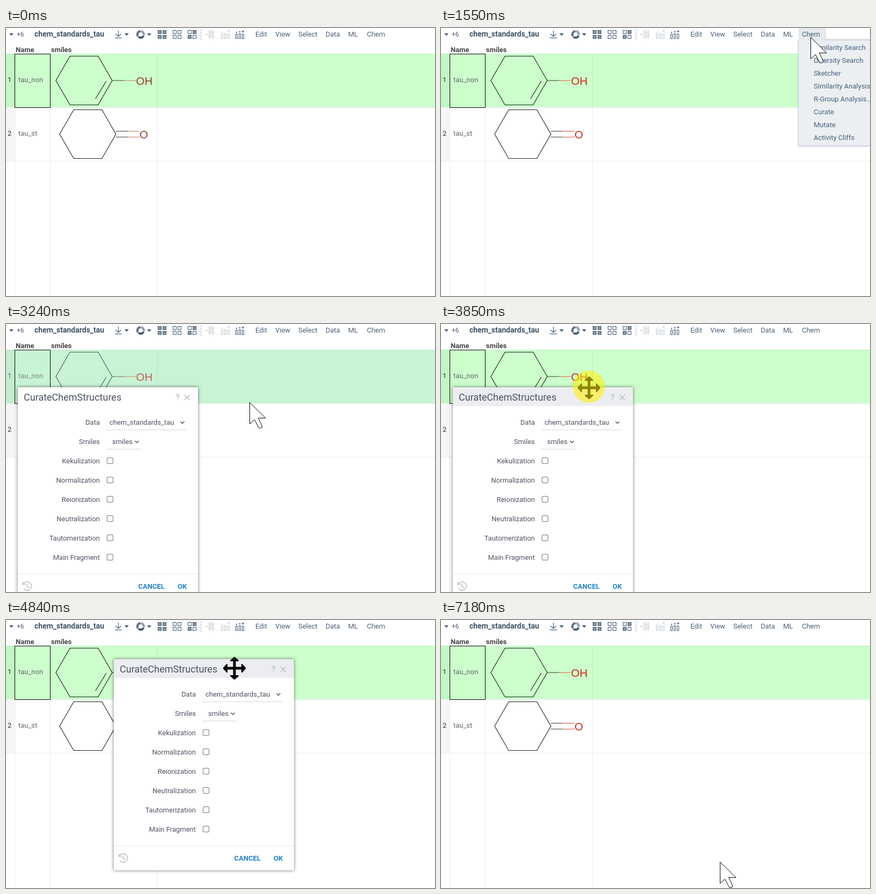
Write an HTML page with a canvas that moves like this. It is 800 by 500 pixels and loops after 8 s.

```html
<!DOCTYPE html>
<html lang="en">
<head>
<meta charset="utf-8">
<title>Curate chemical structures</title>
<style>
html, body { margin: 0; width: 100%; height: 100%; overflow: hidden; background: #fff; }
canvas { display: block; }
</style>
</head>
<body>
<canvas id="stage" width="800" height="500"></canvas>
<script>
const ctx = document.getElementById('stage').getContext('2d');
const LOOP = 8000;
const SLATE = '#4d6076';

// Pointer path: time, x, y
const PATH = [
  [270, 758, 494], [1010, 683, 151], [1080, 682, 143], [1150, 681, 135], [1210, 681, 135],
  [1500, 689, 17], [1940, 689, 17], [2340, 699, 158], [2940, 699, 158], [3510, 247, 135],
  [3780, 247, 135], [3850, 276, 119], [3920, 276, 119], [4110, 426, 90], [4840, 426, 90],
  [5630, 376, 358], [6230, 376, 358], [6360, 448, 358], [6440, 448, 358],
  [6800, 525, 451], [6980, 520, 451]
];
const CLICKS = [[2740, 2870], [3710, 4180], [5840, 5970], [7040, 7180]];
const MENU = [1480, 2870], DIALOG = [2940, 7180], CHECKED_AT = 5970;
const GRAB = { x: 225, y: 17 }, DRAG_LAG = 70;

const within = (t, [from, to]) => t >= from && t < to;

function pointerAt(t) {
  const next = PATH.findIndex(key => key[0] > t);
  if (next === 0) return { x: PATH[0][1], y: PATH[0][2] };
  if (next < 0) { const [, x, y] = PATH[PATH.length - 1]; return { x, y }; }
  const [t0, x0, y0] = PATH[next - 1], [t1, x1, y1] = PATH[next];
  const u = (t - t0) / (t1 - t0), e = u * u * (3 - 2 * u);
  return { x: x0 + (x1 - x0) * e, y: y0 + (y1 - y0) * e };
}

function dialogAt(t) {
  const p = pointerAt(Math.min(Math.max(t - DRAG_LAG, 3510), 4500));
  return { x: Math.round(p.x - GRAB.x), y: Math.round(p.y - GRAB.y) };
}

function text(str, x, y, color = SLATE, size = 13, weight = 400, align = 'left') {
  ctx.font = `${weight} ${size}px Roboto, sans-serif`;
  ctx.textAlign = align;
  ctx.fillStyle = color;
  ctx.fillText(str, x, y);
}

function rect(x, y, w, h, color) {
  ctx.fillStyle = color;
  ctx.fillRect(x, y, w, h);
}

function frame(x, y, w, h, color, fill) {
  if (fill) rect(x, y, w, h, fill);
  ctx.strokeStyle = color;
  ctx.lineWidth = 1;
  ctx.strokeRect(x + .5, y + .5, w - 1, h - 1);
}

function line(points, color, width = 1, close = false) {
  ctx.beginPath();
  for (let i = 0; i < points.length; i += 2) ctx.lineTo(points[i], points[i + 1]);
  if (close) ctx.closePath();
  ctx.strokeStyle = color;
  ctx.lineWidth = width;
  ctx.stroke();
}

function arc(x, y, r, from, to, color, width) {
  ctx.beginPath();
  ctx.arc(x, y, r, from, to);
  ctx.strokeStyle = color;
  ctx.lineWidth = width;
  ctx.stroke();
}

function caret(x) {
  ctx.fillStyle = '#43607f';
  ctx.fill(new Path2D(`M${x - 4} 10h8l-4 4.5z`));
}

const chevron = (x, y) => line([x - 3.5, y - 2, x, y + 1.5, x + 3.5, y - 2], '#4a4f57', 1.4);

function squares(x, filled) {
  for (let i = 0; i < 4; i++)
    frame(x + (i % 2) * 9, 4 + (i >> 1) * 9, 7, 7, '#3d5570', filled[i] ? '#8799ab' : '#fff');
}

function bars(x, color, mark) {
  [0, 6, 12].forEach((dx, i) => frame(x + dx, 11 - i % 2, 4, 9 + i % 2, color));
  if (mark === '+') {
    line([x + 14, 4, x + 14, 9], color);
    line([x + 11.5, 6.5, x + 16.5, 6.5], color);
    rect(x + 1, 7, 2, 2, color);
    rect(x + 7, 6, 2, 2, color);
  } else {
    line([x + 12, 4, x + 16, 8], color);
    line([x + 16, 4, x + 12, 8], color);
    rect(x + 1, 7, 2, 2, color);
  }
}

function toolbar() {
  caret(10);
  text('+6', 20, 16, SLATE, 12);
  text('chem_standards_tau', 53, 16, '#3f5268', 14, 700);
  line([209.5, 5, 209.5, 16], '#43607f', 1.2);
  line([204.5, 11, 209.5, 16, 214.5, 11], '#43607f', 1.2);
  line([203, 18.5, 216, 18.5], '#43607f', 1.2);
  caret(225);
  arc(251, 12, 6, -1.4, .2, '#8a9bac', 4);
  arc(251, 12, 6, .4, 2.3, '#43586f', 4);
  arc(251, 12, 6, 2.5, 4.7, '#5b7086', 4);
  caret(267);
  squares(283, [1, 1, 1, 1]);
  squares(311, [0, 0, 0, 0]);
  squares(339, [0, 1, 1, 0]);
  ctx.setLineDash([3, 2]);
  line([363.5, 3, 363.5, 21], '#9aa5b0');
  ctx.setLineDash([]);
  for (const y of [5, 10, 15]) frame(378, y, 10, 4, '#c3c8cd');
  line([372, 10, 376, 14], '#c3c8cd');
  line([376, 10, 372, 14], '#c3c8cd');
  bars(401, '#c3c8cd', 'x');
  bars(428, '#3d5570', '+');
}

function menuBar() {
  [['Edit', 465], ['View', 502], ['Select', 545], ['Data', 596], ['ML', 638], ['Chem', 673]]
    .forEach(([label, x]) => text(label, x, 16));
}

function atom(label, x, y, color) {
  ctx.font = '20.5px "Liberation Sans", Arial, sans-serif';
  ctx.textAlign = 'left';
  ctx.fillStyle = color;
  ctx.fillText(label, x, y);
}

function hexagon(x, y) {
  line([x, y, x + 26.3, y - 45.5, x + 78.8, y - 45.5, x + 105, y,
    x + 78.8, y + 45.5, x + 26.3, y + 45.5], '#10200f', 1.1, true);
}

function bond(x, y, end, color) {
  const mid = (x + end) / 2;
  line([x, y, mid, y], '#2f4030');
  line([mid, y, end, y], color);
}

function grid(t, hoveredRow) {
  const red = t < 1080 ? '#93402f' : '#c62a1b';
  const bondRed = t < 1080 ? '#c9705c' : '#d8503f';
  text('Name', 18, 45, '#444', 13, 700);
  text('smiles', 84, 45, '#444', 13, 700);
  rect(0, 48, 800, 100, '#ccffcc');
  rect(0, 48, 16, 100, '#c4f6c4');
  rect(0, 149, 16, 99, '#f6f6f6');
  for (const y of [48, 148, 248]) rect(0, y, 800, 1, y < 248 ? 'rgba(0,0,0,.06)' : '#ebebeb');
  for (const x of [16, 82, 282]) rect(x, 48, 1, 452, 'rgba(0,0,0,.08)');

  text('1', 3, 101, '#333');
  text('tau_non', 23, 101, '#666');
  hexagon(93, 98);
  line([187, 99, 167, 132], '#10200f', 1.1);
  bond(198, 98, 242, bondRed);
  atom('OH', 242.5, 105.5, red);

  text('2', 3, 201, '#333');
  text('tau_st', 23, 201, '#666');
  hexagon(100, 198);
  bond(205, 192.5, 249, bondRed);
  bond(205, 203.5, 249, bondRed);
  atom('O', 249, 205.5, red);

  if (hoveredRow >= 0) rect(0, 48 + hoveredRow * 100, 800, 100, 'rgba(190,215,228,.3)');
  frame(16, 48, 67, 101, '#000');
}

function chemMenu(pointer) {
  ctx.save();
  ctx.shadowColor = 'rgba(60,90,130,.4)';
  ctx.shadowBlur = 4;
  rect(667, 22, 140, 198, '#eceff2');
  ctx.restore();
  frame(666, 22, 140, 198, '#c3ccd6');
  rect(667, 0, 50, 24, '#e6eaee');
  line([716.5, 0, 716.5, 22], '#ccd4dc');
  text('Chem', 673, 16);
  const hovered = Math.floor((pointer.y - 25) / 24);
  ['Similarity Search', 'Diversity Search', 'Sketcher', 'Similarity Analysis...',
    'R-Group Analysis...', 'Curate', 'Mutate', 'Activity Cliffs'].forEach((label, i) => {
    if (i === hovered) rect(669, 25 + i * 24, 131, 24, '#d6dee6');
    text(label, 695, 41 + i * 24, '#46607e');
  });
}

function checkbox(x, y, checked) {
  ctx.beginPath();
  ctx.roundRect(x + .5, y + .5, 11, 11, 1.5);
  ctx.fillStyle = checked ? '#2083d5' : '#fff';
  ctx.fill();
  ctx.strokeStyle = checked ? '#2083d5' : '#70757c';
  ctx.lineWidth = 1;
  ctx.stroke();
  if (checked) line([x + 2.8, y + 6, x + 5, y + 8.5, x + 9.3, y + 3.5], '#fff', 1.6);
}

function dialog(t, at, headerHovered) {
  ctx.save();
  ctx.translate(at.x, at.y);
  ctx.save();
  ctx.shadowColor = 'rgba(0,0,0,.55)';
  ctx.shadowBlur = 6;
  rect(0, 0, 336, 394, '#fff');
  ctx.restore();
  if (headerHovered) rect(0, 0, 336, 35, '#ebedf1');
  const ink = '#4d5361', faint = '#b4b8bd', blue = '#2083c9';
  text('CurateChemStructures', 11, 25, ink, 18);
  text('?', 294.5, 24, faint, 14, 500);
  line([311, 14, 321, 24], faint, 1.3);
  line([321, 14, 311, 24], faint, 1.3);

  text('Data', 153, 70, ink, 13, 400, 'right');
  text('chem_standards_tau', 171, 70, ink);
  rect(165, 79, 150, 1, '#d5d8dc');
  chevron(307, 66);
  text('Smiles', 153, 106, ink, 13, 400, 'right');
  text('smiles', 176, 106, ink);
  rect(165, 115, 65, 1, '#d5d8dc');
  chevron(222, 102);
  ['Kekulization', 'Normalization', 'Reionization', 'Neutralization',
    'Tautomerization', 'Main Fragment'].forEach((label, i) => {
    text(label, 153, 142 + i * 36, ink, 13, 400, 'right');
    checkbox(166, 131 + i * 36, i === 4 && t >= CHECKED_AT);
  });

  rect(0, 348, 336, 1, '#e8eaec');
  arc(17.5, 371, 8, -2.7, 2.5, '#b9bcc0', 1.4);
  line([9, 363, 9.5, 368, 14.5, 367.5], '#b9bcc0', 1.4);
  line([17, 366, 17, 372, 21, 374], '#b9bcc0', 1.4);
  text('CANCEL', 224.5, 376, blue, 13, 700);
  text('OK', 298, 376, blue, 13, 700);
  ctx.restore();
}

const ARROW = new Path2D('M.5 .5V40.5L9.5 32.5 17 47 20 48.5 23.5 47 23 43 16.5 29.5H30Z');
const HAND = new Path2D('M-3 22V3Q-3 0 0 0T3 3V14Q6 11 9 15 13 13 15 17 20 16 20 21V29L16 36V41H0V37L-9 26Q-11 20-7 20Z');

function drawPointer({ x, y }, kind) {
  ctx.save();
  ctx.translate(Math.round(x), Math.round(y));
  ctx.lineWidth = 1;
  if (kind === 'move') {
    ctx.fillStyle = '#000';
    for (let i = 0; i < 4; i++) {
      ctx.fill(new Path2D('M-2.5 2.5V-13H-8V-14.5L-1-21H1L8-14.5V-13H2.5V2.5Z'));
      ctx.rotate(Math.PI / 2);
    }
  } else {
    const shape = kind === 'hand' ? HAND : ARROW;
    ctx.fillStyle = '#fff';
    ctx.strokeStyle = '#000';
    ctx.fill(shape);
    ctx.stroke(shape);
  }
  ctx.restore();
}

function draw(t) {
  const p = pointerAt(t), box = dialogAt(t);
  const menuOpen = within(t, MENU), dialogOpen = within(t, DIALOG);
  const dx = p.x - box.x, dy = p.y - box.y;
  const overDialog = dialogOpen && dx >= 0 && dx < 336 && dy >= 0 && dy < 394;
  const onHeader = dialogOpen && (within(t, [3510, 4840]) || (overDialog && dy < 35));
  const onControl = overDialog &&
    ((dx > 164 && dx < 181 && dy > 274 && dy < 292) || (dx > 285 && dx < 323 && dy > 355));
  const freePointer = t >= 270 && !menuOpen && !overDialog && !onHeader;
  const row = freePointer && p.y >= 48 && p.y < 248 ? Math.floor((p.y - 48) / 100) : -1;

  rect(0, 0, 800, 500, '#fff');
  toolbar();
  menuBar();
  grid(t, row);
  if (menuOpen) chemMenu(p);
  if (dialogOpen) dialog(t, box, onHeader);
  if (t >= 270) drawPointer(p, onHeader ? 'move' : onControl ? 'hand' : 'arrow');
  if (CLICKS.some(span => within(t, span))) {
    ctx.beginPath();
    ctx.arc(p.x, p.y - (onHeader ? 2 : 0), 30, 0, 2 * Math.PI);
    ctx.fillStyle = 'rgba(255,240,0,.55)';
    ctx.fill();
  }
}

function tick() {
  draw(performance.now() % LOOP);
  requestAnimationFrame(tick);
}
tick();
</script>
</body>
</html>
```
